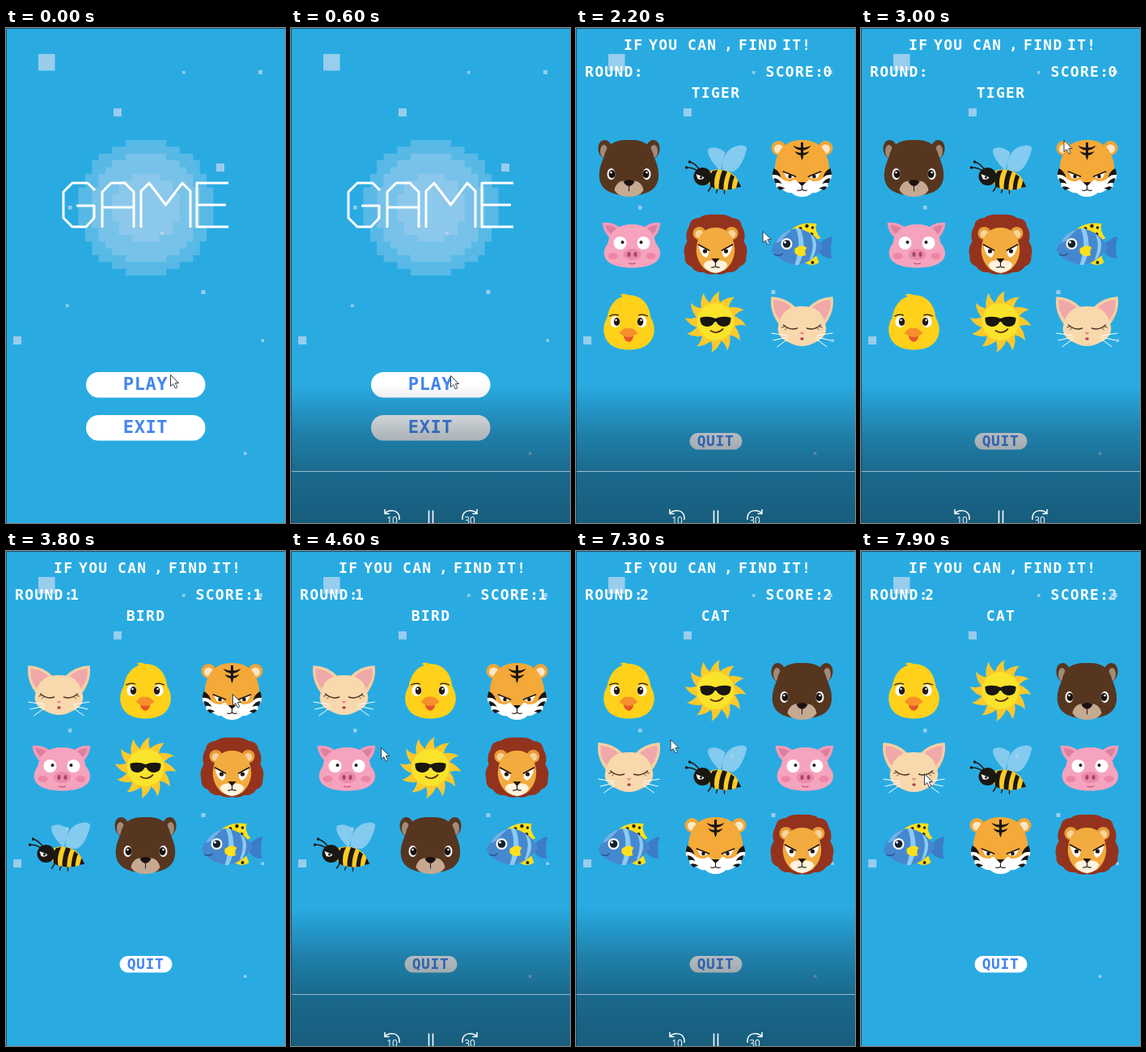
Animation, 345 px wide and 610 px high, one loop 8000 ms. Source, as an HTML page:

```html
<!DOCTYPE html>
<html lang="en">
<head>
<meta charset="utf-8">
<title>Find it</title>
<style>
html, body { margin: 0; width: 100%; height: 100%; overflow: hidden; background: #29abe2; }
svg { display: block; }
text { font: bold 18px "DejaVu Sans Mono", "Liberation Mono", monospace; fill: #fff; letter-spacing: 1.3px; }
.mid { text-anchor: middle; }
.btn text { font-size: 22px; fill: #4285f0; letter-spacing: .6px; }
.btn .small { font-size: 18px; }
.ctl text { font: 12px "Open Sans", sans-serif; letter-spacing: 0; text-anchor: middle; }
.line { fill: none; stroke: #fff; }
.ink { fill: none; stroke: #241812; stroke-linecap: round; }
.edge { fill: none; stroke: #123a52; stroke-opacity: .75; }

#game, #player, #cursor, #playBtn, .dim, .round, .score3, .score2 { animation: 8s linear infinite; }
#game { transform-origin: 172.5px 305px; animation-name: open; }
#player { animation-name: player; }
#cursor { animation-name: cursor; animation-timing-function: ease-in-out; }
#playBtn { animation-name: press; animation-timing-function: step-end; }
.dim { animation-name: dim; }
.round { animation-timing-function: step-end; }
#r0 { animation-name: r0; }
#r1 { animation-name: r1; }
#r2 { animation-name: r2; }
.score2 { animation-name: out; }
.score3 { animation-name: in; }

@keyframes open {
  0%, 19.9% { opacity: 0; transform: scale(.87); }
  20% { opacity: .3; transform: scale(.87); }
  21.25% { opacity: .62; transform: scale(.905); }
  23.75% { opacity: 1; transform: scale(.97); }
  26.25%, 100% { opacity: 1; transform: none; }
}
@keyframes dim {
  0%, 19.9%, 26.25%, 100% { opacity: 0; }
  21.25% { opacity: .07; }
}
@keyframes player {
  0%, .7% { opacity: 0; }
  6.9%, 41.8% { opacity: 1; }
  45%, 47.5% { opacity: 0; }
  52.5%, 92.5% { opacity: 1; }
  97.5%, 100% { opacity: 0; }
}
@keyframes press { 0% { fill: #fff; } 16.25%, 100% { fill: #eaf1f5; } }
@keyframes r0 { 0% { opacity: 1; } 47.45%, 100% { opacity: 0; } }
@keyframes r1 { 0% { opacity: 0; } 47.45% { opacity: 1; } 86.2%, 100% { opacity: 0; } }
@keyframes r2 { 0% { opacity: 0; } 86.2%, 100% { opacity: 1; } }
@keyframes out { 0%, 98% { opacity: 1; } 100% { opacity: 0; } }
@keyframes in { 0%, 98% { opacity: 0; } 100% { opacity: 1; } }
@keyframes cursor {
  0%, 1.2% { transform: translate(203px, 427px); }
  7.5%, 16.2% { transform: translate(197px, 428px); }
  16.25%, 21.25% { transform: translate(194px, 424px); }
  30% { transform: translate(238px, 215px); }
  36%, 38% { transform: translate(250.5px, 138px); }
  42% { transform: translate(276px, 170px); }
  45%, 47.5% { transform: translate(280px, 176px); }
  56.5%, 58% { transform: translate(111px, 242px); }
  63% { transform: translate(82px, 350px); }
  68% { transform: translate(190px, 360px); }
  73% { transform: translate(284px, 335px); }
  77%, 78% { transform: translate(266px, 260px); }
  83.5%, 86.5% { transform: translate(175px, 168px); }
  95%, 100% { transform: translate(78px, 274px); }
}
</style>
</head>
<body>
<svg width="345" height="610" viewBox="0 0 345 610">
<defs>
  <linearGradient id="shade" x2="0" y2="1">
    <stop offset="0" stop-color="#0b2230" stop-opacity="0"/>
    <stop offset=".35" stop-color="#0b2230" stop-opacity=".31"/>
    <stop offset=".63" stop-color="#0b2230" stop-opacity=".48"/>
    <stop offset="1" stop-color="#0b2230" stop-opacity=".57"/>
  </linearGradient>

  <g id="bear">
    <g id="bearEar"><ellipse cx="-29" cy="-22" rx="9" ry="12" fill="#573620" transform="rotate(-12 -29 -22)"/><ellipse cx="-31" cy="-20" rx="4.500" ry="8" fill="#a18a78"/></g>
    <use href="#bearEar" transform="scale(-1 1)"/>
    <path fill="#573620" d="M0-34C-17-35-28-29-31-13C-38 2-40 18-29 27C-17 37 17 37 29 27C40 18 38 2 31-13C28-29 17-35 0-34z"/>
    <path fill="#c6a991" d="M0 17C9 14 17 19 18 28Q13 36 0 36Q-13 36-18 28C-17 19-9 14 0 17z"/>
    <path fill="#1c1210" d="M-7 17Q0 13 7 17Q5 22 0 23Q-5 22-7 17z"/>
    <path class="ink" d="M0 23V29"/>
    <g id="bearEye"><ellipse cx="-22" cy="8" rx="5" ry="7" fill="#fff"/><ellipse cx="-21" cy="8" rx="4" ry="5" fill="#17100d"/><circle cx="-22" cy="6" r="1.300" fill="#fff"/></g>
    <use href="#bearEye" transform="scale(-1 1)"/>
  </g>

  <g id="tiger">
    <g id="tigerEar"><circle cx="-29" cy="-24" r="9" fill="#f1a536"/><circle cx="-29" cy="-23" r="5.500" fill="#fbe7c8"/></g>
    <use href="#tigerEar" transform="scale(-1 1)"/>
    <path fill="#fff" d="M-31-2L-37 8L-36 14L-32 16L-32 24L-26 25Q-20 32-13 31Q-8 36 0 36Q8 36 13 31Q20 32 26 25L32 24L32 16L36 14L37 8L31-2z"/>
    <path fill="#f4a938" d="M0-34C-18-34-28-25-32-10Q-36 2-30 8Q-24 18-13 17Q-8 12-6 18H6Q8 12 13 17Q24 18 30 8Q36 2 32-10C28-25 18-34 0-34z"/>
    <path fill="#1a1512" d="M-1.500-31H1.500V-13L0-9L-1.500-13zM-11-27Q0-22 11-27Q8-22 0-21Q-8-22-11-27zM-9-20Q0-16 9-20Q6-15 0-15Q-6-15-9-20zM-5 18H5L0 23z"/>
    <g id="tigerSide">
      <path fill="#1a1512" d="M-35 1Q-28 4-26 12Q-31 8-37 9zM-35 13Q-29 13-25 20Q-30 18-33 19zM-31 24Q-26 22-21 26Q-25 26-27 28z"/>
      <path fill="#fff" d="M-23 5L-9 11Q-13 15-19 13z"/>
      <path class="ink" stroke-width="1.800" d="M-23 5L-8 11"/><circle cx="-15" cy="11" r="2.300" fill="#1a1512"/>
    </g>
    <use href="#tigerSide" transform="scale(-1 1)"/>
    <path class="ink" stroke-width="1.100" d="M0 23V27M-6 28Q-2 29 0 27Q2 29 6 28"/>
  </g>

  <g id="lion">
    <path fill="#93331d" d="M0-37Q-14-38-20-33Q-31-33-33-22Q-38-13-35-4Q-41 5-38 14Q-39 24-30 27Q-25 35-15 34Q-8 38 0 36Q8 38 15 34Q25 35 30 27Q39 24 38 14Q41 5 35-4Q38-13 33-22Q31-33 20-33Q14-38 0-37z"/>
    <g fill="#e99d36"><circle cx="-20" cy="-14" r="8"/><circle cx="20" cy="-14" r="8"/></g>
    <g fill="#f8d39b"><circle cx="-20" cy="-13" r="5"/><circle cx="20" cy="-13" r="5"/></g>
    <path fill="#f2ab3e" d="M0-21C-13-21-21-13-23 0C-26 12-20 25-12 31Q0 37 12 31C20 25 26 12 23 0C21-13 13-21 0-21z"/>
    <path fill="#fff3df" d="M0 20Q-12 18-15 25Q-11 34 0 35Q11 34 15 25Q12 18 0 20z"/>
    <path fill="#221510" d="M-5 17H5L0 23z"/>
    <g id="lionEye"><path fill="#fff" d="M-21 1L-8 7Q-8 14-12 16Q-19 13-21 1z"/><path class="ink" stroke-width="1.700" d="M-21 0L-8 7"/><circle cx="-13" cy="8" r="2.600" fill="#221510"/></g>
    <use href="#lionEye" transform="scale(-1 1)"/>
    <path class="ink" stroke-width="1.100" d="M0 22V27M-5 28Q0 28 0 26Q0 28 5 28"/>
  </g>

  <g id="pig">
    <path fill="#f49ab8" d="M-21-6Q-32-14-33-27Q-18-29-8-18zM28-6Q38-14 39-27Q25-29 15-18z"/>
    <path fill="#dd7f9f" d="M-20-11Q-28-17-29-24Q-19-24-13-18zM27-11Q34-17 35-24Q26-24 20-18z"/>
    <path fill="#f6a3bd" d="M4-25C-13-25-24-17-26-2C-33 7-33 18-21 24C-9 30 17 30 29 24C41 18 41 7 33-2C31-17 20-25 4-25z"/>
    <g fill="#ee85a7"><ellipse cx="-20" cy="14" rx="6" ry="4"/><ellipse cx="27" cy="14" rx="6" ry="4"/></g>
    <ellipse cx="4" cy="12" rx="11" ry="7" fill="#e98aaa"/>
    <g fill="#a94169"><ellipse cx="0" cy="12" rx="2" ry="3"/><ellipse cx="8" cy="12" rx="2" ry="3"/></g>
    <g fill="#fff"><circle cx="-11" cy="-2" r="8"/><circle cx="18" cy="-2" r="8"/></g>
    <g fill="#241812"><circle cx="-8" cy="-3" r="2"/><circle cx="15" cy="-3" r="2"/></g>
    <path class="ink" style="stroke: #a94169" d="M0 23Q4 25 8 23"/>
  </g>

  <g id="fish">
    <path fill="#ffe01a" d="M-15-17Q-4-29 18-26Q15-17 23-8L10-3zM0 20Q12 29 21 22L17 12z"/>
    <g fill="#20241c"><circle cx="-2" cy="-20" r="2"/><circle cx="6" cy="-23" r="2.200"/><circle cx="13" cy="-21" r="1.800"/><circle cx="12" cy="-13" r="2"/><circle cx="13" cy="22" r="2"/></g>
    <path fill="#3b7cc6" d="M21 0Q29-9 38-10Q34 3 37 17Q27 17 21 9z"/>
    <path fill="#4688cf" d="M-38 7Q-30-17-8-20Q14-18 26 3Q14 22-6 25Q-28 22-38 7z"/>
    <path fill="#8accf1" d="M-8-20Q0-4-9 25L-4 25Q7 4-2-20zM10-13Q17 0 9 19L13 17Q21 2 15-9z"/>
    <path fill="#70b3e6" d="M-33-2Q-26-16-12-19Q-22-10-25-5z"/>
    <path fill="#ffe01a" d="M-9 5Q1-2 6 4Q2 8 5 13Q-4 16-9 10z"/>
    <circle cx="-19" cy="-1" r="7" fill="#fff"/><circle cx="-19" cy="-1" r="4.800" fill="#14202c"/><circle cx="-21" cy="-3" r="1.500" fill="#fff"/>
    <path class="ink" style="stroke: #2a5590" stroke-width="1.400" d="M-34 12Q-28 15-24 11"/>
  </g>

  <g id="duck">
    <path fill="#ffd11a" d="M-1-33Q-7-36-11-33Q-8-32-8-31C-19-28-25-17-27-5C-34 6-33 22-20 30C-10 36 10 36 20 30C33 22 34 6 27-5C25-22 16-33-1-33z"/>
    <g id="duckEye"><ellipse cx="-17" cy="0" rx="6" ry="7" fill="#fff"/><ellipse cx="-15" cy="0" rx="3.700" ry="5" fill="#241812"/><circle cx="-16" cy="-2" r="1.200" fill="#fff"/><path class="ink" stroke-width="1.200" d="M-24-7Q-18-10-13-8"/></g>
    <use href="#duckEye" transform="translate(-1) scale(-1 1)"/>
    <path fill="#e8542a" d="M-7 16H6Q5 24 0 25Q-6 24-7 16z"/>
    <path fill="#f7902a" d="M-12 14Q-5 6-1 8Q4 6 11 14Q5 19 0 19Q-6 19-12 14z"/>
  </g>

  <path id="ray" fill="#fcc92c" d="M-8-19Q-6-31 5-38Q2-28 8-19z"/>
  <g id="sun">
    <g id="rays"></g>
    <circle r="23" fill="#fae32b"/>
    <path fill="#191511" d="M-19-5Q-9-8 0-4Q9-8 19-5Q20 5 11 6Q4 6 1 0H-1Q-4 6-11 6Q-20 5-19-5z"/>
    <path class="ink" style="stroke: #5a3210" stroke-width="1.800" d="M-6 11Q2 16 9 9"/>
  </g>

  <g id="cat">
    <g id="catEar"><path fill="#f5cfa3" d="M-28 4Q-41-13-38-31Q-19-30-7-17z"/><path fill="#f0a8a8" d="M-27-2Q-37-14-35-27Q-20-26-12-16z"/></g>
    <use href="#catEar" transform="scale(-1 1)"/>
    <path fill="#f8d8ad" d="M0-19C-16-20-26-11-28 1C-33 12-27 21-17 25Q0 35 17 25C27 21 33 12 28 1C26-11 16-20 0-19z"/>
    <g id="catSide">
      <path class="ink" style="stroke: #49301f" stroke-width="1.500" d="M-23 4Q-15 11-6 8"/>
      <path class="ink" style="stroke: #49301f" stroke-width=".9" d="M-22 6L-25 7M-19 8L-21 10"/>
      <path class="line" stroke-width="1" d="M-18 17L-38 14M-18 19L-36 23M-17 21L-31 31"/>
    </g>
    <use href="#catSide" transform="scale(-1 1)"/>
    <path fill="#e9818b" d="M-3 13H3L0 16z"/><ellipse cy="21" rx="2.300" ry="1.800" fill="#a84945"/>
  </g>

  <g id="bee">
    <path fill="#a5d4f3" opacity=".75" d="M6 4Q-12-14-9-23Q0-28 12-19zM8 4Q8-20 24-26Q36-30 39-24Q33 0 22 5z"/>
    <path class="ink" stroke-width="1.400" d="M-21 5Q-27 0-35 0M-19 4Q-24-5-32-7M-5 23L-9 29M3 25L1 31M11 26L11 32"/>
    <circle cx="-36" cy="0" r="1.700" fill="#1b1713"/><circle cx="-32" cy="-7" r="1.700" fill="#1b1713"/>
    <g transform="rotate(9 8 14)">
      <path fill="#ffcb25" d="M-12 14Q-10 3 6 3Q22 3 28 13Q31 20 24 24Q14 28 2 27Q-9 25-12 14z"/>
      <path fill="#1b1713" d="M-5 6L1 4Q-3 15 1 27L-5 25Q-9 14-5 6zM7 3L13 4Q10 15 12 27L6 27Q4 15 7 3zM18 6L23 9Q21 15 22 25L17 26Q16 15 18 6zM28 13L33 20L27 22z"/>
    </g>
    <circle cx="-16" cy="11" r="11" fill="#1b1713"/>
    <path fill="#fff" d="M-24 8L-14 12Q-16 16-22 14z"/><circle cx="-18" cy="12" r="1.600" fill="#1b1713"/>
  </g>

  <g id="bg"><rect width="345" height="610" fill="#29abe2"/></g>
</defs>

<use href="#bg"/>
<g id="menu">
  <g id="discs" fill="#b3d2ee" fill-opacity=".34"></g>
  <g class="line" role="img" aria-label="GAME" stroke-width="3" stroke-linejoin="round">
    <path d="M110 200L101 191H82L71 202V234L82 245H99L109 234V219H87M119 246V202L130 191H147L158 202V246M119 221H158M167 246V201L177 191L197.500 218L218 191L228 201V246M275 191H236V245H275M236 218H272"/>
  </g>
  <g class="btn">
    <rect id="playBtn" x="99" y="424" width="147.500" height="31.500" rx="15.700"/>
    <rect x="99" y="477" width="147.500" height="31.500" rx="15.700" fill="#fff"/>
    <text class="mid" x="172.500" y="446">PLAY</text>
    <text class="mid" x="172.500" y="498.500">EXIT</text>
  </g>
  <rect class="dim" width="345" height="610"/>
</g>

<g id="game">
  <use href="#bg"/>
  <rect class="dim" width="345" height="610"/>
  <text y="27"><tspan x="59">IF</tspan> <tspan x="90">YOU</tspan> <tspan x="138">CAN</tspan> <tspan x="183">,</tspan> <tspan x="201">FIND</tspan> <tspan x="255">IT!</tspan></text>
  <text x="11" y="60">ROUND:</text>
  <text x="234.500" y="60">SCORE:</text>
  <g class="btn"><rect x="140.500" y="499" width="65" height="20.500" rx="10.200" fill="#fff"/><text class="mid small" x="172.500" y="515">QUIT</text></g>
  <g id="rounds"></g>
</g>

<g id="player" class="ctl">
  <rect y="440" width="345" height="170" fill="url(#shade)"/>
  <path class="line" stroke-opacity=".55" d="M0 546.500H345"/>
  <g id="skip" class="line" stroke-width="1.500"><path d="M116 598C121 593 133 593 134 603V606M116 593V598.500H121.500"/></g>
  <use href="#skip" transform="matrix(-1 0 0 1 346 0)"/>
  <path class="line" stroke-width="1.600" d="M170.500 594.500V610M175.500 594.500V610"/>
  <text x="125" y="611">10</text><text x="221" y="611">30</text>
</g>

<path id="cursor" d="M.5.5V14.500L3.800 11.500L6.300 17L8.800 15.800L6.300 10.500H10.500z" fill="#fff" stroke="#333f4d" stroke-width="1"/>
<path class="edge" d="M.5 610V.5H345"/>
</svg>

<script>
const NS = "http://www.w3.org/2000/svg";
const $ = id => document.getElementById(id);

function add(parent, tag, attrs, text = "") {
  const el = document.createElementNS(NS, tag);
  for (const k in attrs) el.setAttribute(k, attrs[k]);
  el.textContent = text;
  return parent.appendChild(el);
}

// floating squares: x, y, size
[[40, 32, 20.5], [133, 99, 10], [260, 167, 10], [218, 53, 3.5], [312, 52, 5], [77, 219, 4.5],
 [191, 251, 4], [241.500, 323, 5], [74, 340.500, 3.5], [9, 380, 10], [315.500, 383.500, 3.5], [294, 522.500, 3.5]]
  .forEach(([x, y, s]) => add($("bg"), "rect", { x, y, width: s, height: s, fill: "#b5d6ef", "fill-opacity": .8 }));

// stepped discs behind the title
const cell = 8.35;
for (const r of [10, 8, 5]) {
  let d = "";
  for (let j = -r; j < r; j++) {
    const half = Math.round(Math.sqrt(r * r - (j + .5) ** 2)) * cell;
    d += `M${173 - half} ${221.5 + j * cell}h${2 * half}v${cell}h${-2 * half}z`;
  }
  add($("discs"), "path", { d });
}

for (let a = 0; a < 360; a += 30) add($("rays"), "use", { href: "#ray", transform: `rotate(${a})` });

const rounds = [
  { goal: "TIGER", num: "", score: "0", grid: "bear bee tiger pig lion fish duck sun cat" },
  { goal: "BIRD", num: "1", score: "1", grid: "cat duck tiger pig sun lion bee bear fish" },
  { goal: "CAT", num: "2", score: "2", grid: "duck sun bear cat bee pig fish tiger lion" }
];
rounds.forEach((r, i) => {
  const g = add($("rounds"), "g", { id: "r" + i, class: "round" });
  add(g, "text", { class: "mid", x: 173, y: 86 }, r.goal);
  add(g, "text", { x: 79, y: 60 }, r.num);
  add(g, "text", { x: 305.5, y: 60, class: i == 2 ? "score2" : "" }, r.score);
  if (i == 2) add(g, "text", { x: 305.5, y: 60, class: "score3" }, "3");
  r.grid.split(" ").forEach((name, k) => add(g, "use", {
    href: "#" + name, x: 65.5 + k % 3 * 107, y: 172 + Math.floor(k / 3) * 95
  }));
});
</script>
</body>
</html>
```
